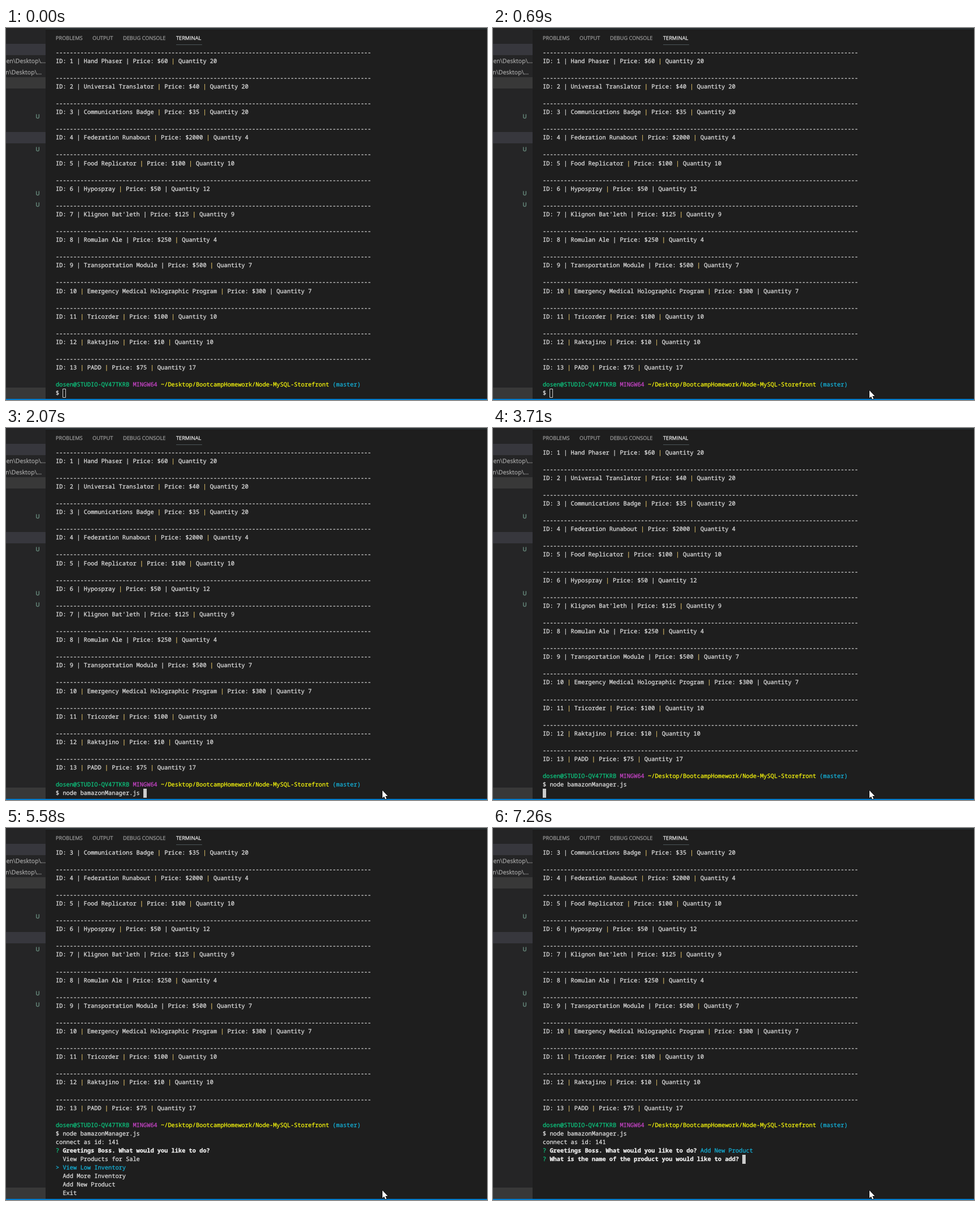
Recreate the animation shown at these times as an HTML page with a canvas. Size 851 px wide and 658 px high, loop 8000 ms.

```html
<!DOCTYPE html>
<html lang="en">
<head>
<meta charset="utf-8">
<title>Storefront terminal</title>
<style>
html, body { margin: 0; width: 100%; height: 100%; overflow: hidden; background: #1e1e1e; }
canvas { display: block; }
</style>
</head>
<body>
<canvas id="stage" width="851" height="658"></canvas>
<script>
const ctx = document.getElementById('stage').getContext('2d', { alpha: false });
const LOOP = 8000;
const LEFT = 88, TOP = 35.6, CELL_W = 6.2, CELL_H = 15.07, ROWS = 41;
const MONO = '10.333px "Noto Sans Mono", monospace';
const UI = '"Open Sans", sans-serif';
const FG = '#e2e2e2', BOLD = '#f0f0f0', GREEN = '#0dc880', MAGENTA = '#c844c8',
      YELLOW = '#f8f80c', CYAN = '#14b4dc', BAR = '#e0c068';

// Times of the hard changes, in ms
const ENTER = 230, ARRIVE = 690, FOCUS = 1000, COMMAND = 2070, RUN = 3710,
      MENU = 4470, PICK = [5580, 5890, 6200], ANSWER = 7260;

const products = [
  ['Hand Phaser', 60, 20], ['Universal Translator', 40, 20],
  ['Communications Badge', 35, 20], ['Federation Runabout', 2000, 4],
  ['Food Replicator', 100, 10], ['Hypospray', 50, 12],
  ["Klignon Bat'leth", 125, 9], ['Romulan Ale', 250, 4],
  ['Transportation Module', 500, 7],
  ['Emergency Medical Holographic Program', 300, 7],
  ['Tricorder', 100, 10], ['Raktajino', 10, 10], ['PADD', 75, 17]
];
const choices = ['View Products for Sale', 'View Low Inventory',
  'Add More Inventory', 'Add New Product', 'Exit'];

// A line is a list of spans: [text, colour, bold]
const plain = text => [[text, FG]];
const question = (text, ...rest) => [['? ', GREEN], [text, BOLD, true], ...rest];

const history = products.flatMap(([name, price, count], i) => [
  plain('-'.repeat(90)),
  plain(`ID: ${i + 1} | ${name} | Price: $${price} | Quantity ${count}`),
  []
]);
history.push([
  ['dosen@STUDIO-QV47TKRB ', GREEN], ['MINGW64 ', MAGENTA],
  ['~/Desktop/BootcampHomework/Node-MySQL-Storefront ', YELLOW], ['(master)', CYAN]
]);

function terminalAt(t) {
  const lines = [...history, plain(t < COMMAND ? '$ ' : '$ node bamazonManager.js ')];
  if (t < RUN) return { lines, scroll: 0, cursor: true };
  if (t < MENU) return { lines: [...lines, plain('')], scroll: 1, cursor: true };

  lines.push(plain('connect as id: 141'));
  const greeting = 'Greetings Boss. What would you like to do? ';
  if (t >= ANSWER) {
    lines.push(question(greeting, [choices[3], CYAN]),
               question('What is the name of the product you would like to add? '));
    return { lines, scroll: 7, cursor: true };
  }
  const picked = PICK.filter(time => t >= time).length;
  lines.push(picked ? question(greeting) : question(greeting, ['(Use arrow keys)', FG]));
  choices.forEach((choice, i) =>
    lines.push(i === picked ? [['> ' + choice, CYAN]] : plain('  ' + choice)));
  return { lines, scroll: 7, cursor: false };
}

function rect(x, y, w, h, color) {
  ctx.fillStyle = color;
  ctx.fillRect(x, y, w, h);
}

// A hairline stroke gives small type the weight of hinted screen text
function inkText(text, x, y, color) {
  ctx.fillStyle = ctx.strokeStyle = color;
  ctx.lineWidth = 0.25;
  ctx.fillText(text, x, y);
  ctx.strokeText(text, x, y);
}

function label(text, x, y, size, color, align = 'left', weight = 400) {
  ctx.font = `${weight} ${size}px ${UI}`;
  ctx.textAlign = align;
  inkText(text, x, y, color);
}

function drawFrame() {
  rect(0, 0, 851, 658, '#1e1e1e');
  rect(70, 1, 781, 1, '#344248');

  rect(0, 0, 70, 656, '#252526');
  rect(0, 28, 70, 20, '#37373d');
  rect(0, 87, 70, 20, '#383838');
  rect(0, 184, 70, 20, '#37373d');
  rect(0, 636, 70, 20, '#383838');
  label('sen\\Desktop\\...', 70, 62, 10.6, '#a6a6a6', 'right');
  label('en\\Desktop\\...', 63, 82, 10.6, '#a6a6a6', 'right');
  for (const y of [160, 218, 296, 316]) label('U', 56, y, 10.3, '#66877a', 'center', 600);

  label('PROBLEMS', 88, 21, 9.2, '#9c9c9c');
  label('OUTPUT', 153, 21, 9.2, '#9c9c9c');
  label('DEBUG CONSOLE', 207, 21, 9.2, '#9c9c9c');
  label('TERMINAL', 301, 21, 9.2, '#f0f0f0');
  rect(301, 29, 46, 1, '#4a5458');

  rect(0, 656, 851, 2, '#007acc');
}

function drawLine(spans, row) {
  const baseline = Math.round(TOP + 11 + row * CELL_H);
  let col = 0;
  for (const [text, color, bold] of spans) {
    ctx.font = (bold ? 'bold ' : '') + MONO;
    for (const char of text) {
      const x = LEFT + col++ * CELL_W;
      if (char === ' ') continue;
      // Subpixel fringe on separators that fall between pixels
      const fringe = char === '|' && x % 1 > 0.35 && x % 1 < 0.9;
      inkText(char, x, baseline, fringe ? BAR : color);
    }
  }
  return col;
}

function drawCursor(col, row, focused) {
  const x = Math.round(LEFT + col * CELL_W), y = Math.round(TOP + row * CELL_H);
  if (focused) return rect(x, y, 6, 16, '#cccccc');
  ctx.strokeStyle = '#cccccc';
  ctx.lineWidth = 1;
  ctx.strokeRect(x + 0.5, y + 0.5, 5, 15);
}

function drawTerminal(t) {
  const { lines, scroll, cursor } = terminalAt(t);
  ctx.textAlign = 'left';
  let endCol = 0;
  lines.slice(scroll, scroll + ROWS).forEach((spans, row) => {
    endCol = drawLine(spans, row);
  });
  if (cursor) drawCursor(endCol, lines.length - 1 - scroll, t >= FOCUS);
}

const pointerStep = t =>
  t < ENTER ? -1 : Math.min(6, Math.floor((t - ENTER) / (ARRIVE - ENTER) * 6 + 1e-6));

function drawPointer(step) {
  if (step < 0) return;
  const left = (1 - step / 6) ** 2;
  ctx.save();
  ctx.translate(666 + 28 * left, 641 + 13 * left);
  ctx.beginPath();
  for (const [x, y] of [[0, 0], [0, 13.5], [3, 10.8], [5.2, 15.8], [7.2, 14.8], [5.2, 10], [9.4, 10]])
    ctx.lineTo(x, y);
  ctx.closePath();
  ctx.lineWidth = 1.2;
  ctx.strokeStyle = '#000';
  ctx.stroke();
  ctx.fillStyle = '#fff';
  ctx.fill();
  ctx.restore();
}

const changes = [FOCUS, COMMAND, RUN, MENU, ...PICK, ANSWER];
const start = performance.now();
let shown = '';

function render() {
  const t = (performance.now() - start) % LOOP;
  const step = pointerStep(t);
  const state = step + ':' + changes.filter(time => t >= time).length;
  if (state !== shown) {
    shown = state;
    drawFrame();
    drawTerminal(t);
    drawPointer(step);
  }
  requestAnimationFrame(render);
}

ctx.textRendering = 'geometricPrecision';
ctx.lineJoin = 'round';
render();
</script>
</body>
</html>
```
